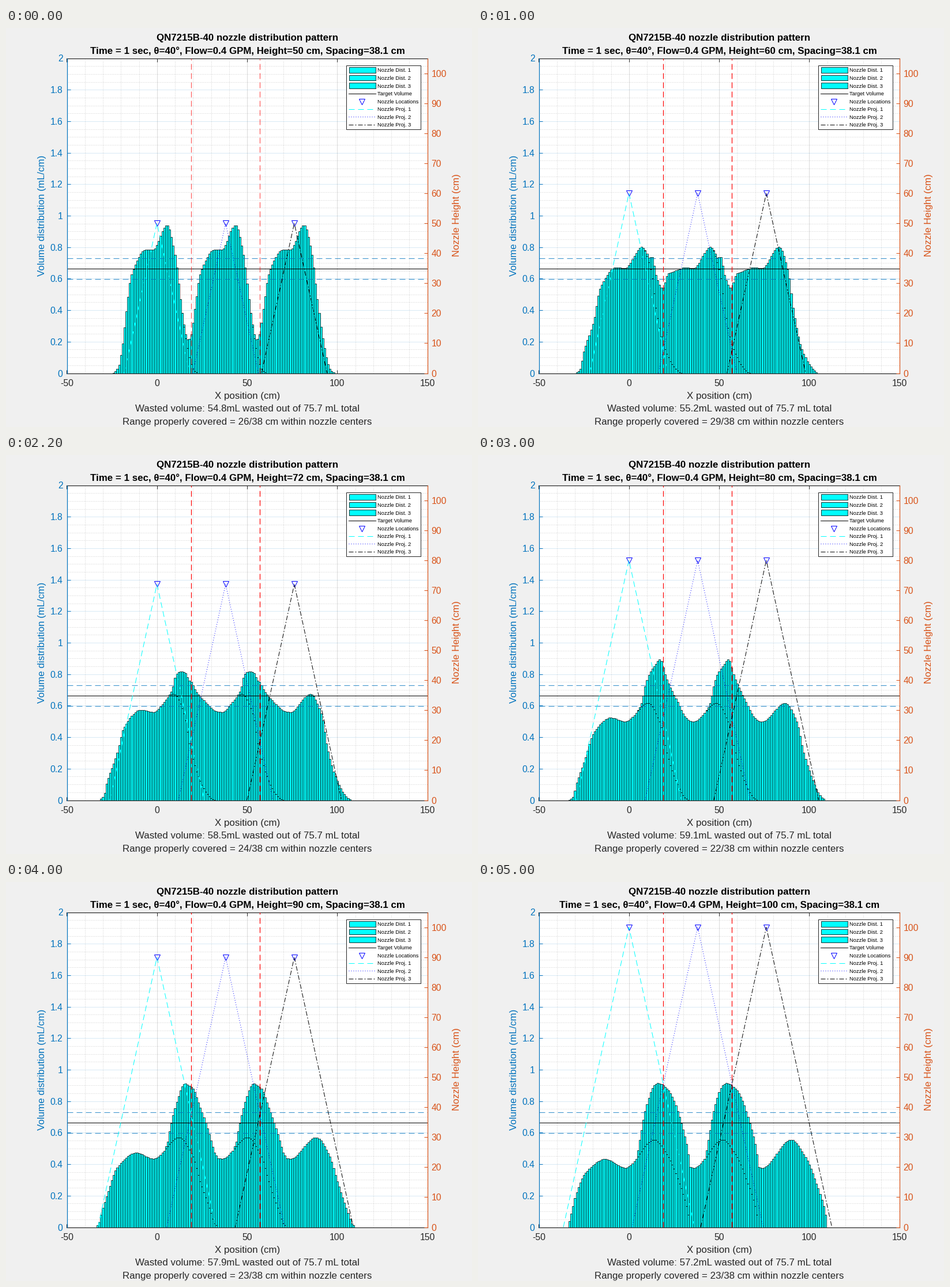
These frames come from a looping animation (808 by 693 pixels, 5.1 s). A matplotlib script:

```python
import numpy as np
import matplotlib.pyplot as plt
from matplotlib.animation import FuncAnimation
from matplotlib.collections import PolyCollection
from matplotlib.patches import Rectangle

W, H, DPI = 808, 693, 100
PX = 72 / DPI  # points per pixel
LEFT, RIGHT, TOP, BOTTOM = 105.5, 730.5, 52.5, 599.5

BLUE, ORANGE, INK = "#0072BD", "#D95319", "#262626"
DASH = (0, (10 * PX, 6 * PX))
DOT = (0, (1 * PX, 3 * PX))
DASH_DOT = (0, (8 * PX, 3 * PX, 2 * PX, 3 * PX))

FIRST, LAST = 50, 100  # nozzle heights in cm
SPACING = 38.1
NOZZLES = SPACING * np.arange(3)
SHIFTS = np.rint(NOZZLES).astype(int)
TARGET = 75.7 / 3 / SPACING
HALF_ANGLE = np.radians(20)
REACH = 33  # a spray covers this many cm on each side
BAR = 1

# Readouts at the heights where their trend changes
KEY_HEIGHTS = [50, 60, 72, 80, 85, 100]
WASTED = [54.8, 55.2, 58.5, 59.1, 58.2, 57.2]
COVERED = [26, 29, 24, 22, 23, 23]

plt.rcParams.update({
    "font.family": "Liberation Sans",
    "axes.unicode_minus": False,
    "lines.scale_dashes": False,
    "lines.linewidth": PX,
    "axes.linewidth": 1.2 * PX,
})


def monotone(x, xs, ys):
    """Cubic through the points that is flat at their highs and lows."""
    step = np.diff(xs)
    rise = np.diff(ys) / step
    a, b = rise[:-1], rise[1:]
    slope = np.zeros(len(xs))
    same = a * b > 0
    slope[1:-1][same] = 2 * (a * b)[same] / (a + b)[same]
    i = np.clip(np.searchsorted(xs, x) - 1, 0, len(step) - 1)
    t = np.clip((x - xs[i]) / step[i], 0, 1)
    return (ys[i] + (ys[i + 1] - ys[i]) * t * t * (3 - 2 * t)
            + step[i] * t * (1 - t) * (slope[i] * (1 - t) - slope[i + 1] * t))


def spray(height):
    """Volume per cm under one nozzle: a low hump, a dip and a high peak."""
    u = (height - FIRST) / (LAST - FIRST)
    root = np.sqrt(u)
    hump = 0.785 * (height / FIRST) ** -0.86
    dip = hump * (1 - 0.13 * u * u)
    peak = 0.555 + 0.385 * (1 - u) ** 2
    left_foot, right_foot = -21.7 - 12 * root, 20 + 14 * root
    points = np.array([
        (left_foot - 3, 0),
        (left_foot, 0.04 * hump),
        (-19.4 - 12.6 * root, 0.2 * hump),
        (-17 - 12.2 * u, 0.5 * hump),
        (-14 - 10 * u, 0.8 * hump),
        (-6 - 7 * u, hump),
        (-2, dip),
        (5.5 + 8.5 * u, peak),
        (10 + 12 * u, 0.8 * peak),
        (13 + 10 * u + 5 * u * u, 0.5 * peak),
        (16.5 + 16 * u, 0.2 * peak),
        (right_foot, 0.03 * peak),
        (right_foot + 3, 0),
    ])
    return monotone(np.arange(-REACH, REACH + 1), *points.T)


def stacked_bars(height):
    """Rectangles of each nozzle, stacked on the nozzles before it."""
    single = spray(height)
    base = np.zeros(SHIFTS[-1] + 2 * REACH + 1)
    groups = []
    for shift in SHIFTS:
        rects = []
        for k, v in enumerate(single):
            if v < 0.002:
                continue
            low = base[shift + k]
            x0 = shift + k - REACH - BAR / 2
            x1, high = x0 + BAR, low + v
            rects.append([(x0, low), (x0, high), (x1, high), (x1, low)])
        base[shift:shift + len(single)] += single
        groups.append(rects)
    return groups


fig = plt.figure(figsize=(W / DPI, H / DPI), dpi=DPI, facecolor="#F0F0F0")

# Plot area with its two value axes
ax = fig.add_axes([LEFT / W, 1 - BOTTOM / H, (RIGHT - LEFT) / W, (BOTTOM - TOP) / H])
right = ax.twinx()
ax.set(xlim=(-50, 150), ylim=(0, 2), xticks=range(-50, 151, 50),
       yticks=np.arange(11) / 5)
right.set(ylim=(0, 105), yticks=range(0, 101, 10))
ax.yaxis.set_major_formatter("{x:g}")
ax.set_axisbelow(True)

tick = dict(direction="in", length=6 * PX, width=PX, labelsize=15.8 * PX)
ax.tick_params(axis="x", top=True, color=INK, labelcolor=INK, pad=10.5 * PX, **tick)
ax.tick_params(axis="y", colors=BLUE, pad=7 * PX, **tick)
right.tick_params(axis="y", colors=ORANGE, pad=7 * PX, **tick)
for side, spine in ax.spines.items():
    spine.set_color(BLUE if side == "left" else INK)
ax.spines["right"].set_visible(False)
ax.spines["left"].set_zorder(3)
for side, spine in right.spines.items():
    spine.set_visible(side == "right")
    spine.set_color(ORANGE)

# Grid
minor = dict(colors="0.1", alpha=0.22, linewidths=PX,
             linestyles=[(0, (1 * PX, 2 * PX))], zorder=0.1)
ax.vlines([x for x in range(-40, 150, 10) if x % 50], 0, 2, **minor)
ax.hlines([k / 20 for k in range(1, 40) if k % 4], -50, 150, **minor)
ax.vlines([0, 50, 100], 0, 2, colors=INK, alpha=0.17, linewidths=PX, zorder=0.2)
ax.hlines(np.arange(1, 10) / 5, -50, 150, colors=BLUE, alpha=0.15,
          linewidths=PX, zorder=0.2)

# Bars and limits
bars = []
for _ in NOZZLES:
    group = PolyCollection([], facecolors="cyan", edgecolors="black",
                           linewidths=0.7 * PX, zorder=1)
    bars.append(ax.add_collection(group, autolim=False))
ax.axhline(TARGET, color="black", zorder=2)
for factor in (0.9, 1.1):
    ax.axhline(factor * TARGET, color=BLUE, alpha=0.8, ls=DASH, zorder=2)

# Nozzles and their projections
borders = [right.axvline(x, color="red", ls=DASH, lw=1.2 * PX)
           for x in (SPACING / 2, SPACING * 1.5)]
marker = dict(marker="v", ls="none", ms=10 * PX, mfc="none", mec="blue", mew=PX)
heads, = right.plot([], [], **marker)
STYLES = [("cyan", DASH), ("blue", DOT), ("black", DASH_DOT)]
rays = [right.plot([], [], color=c, ls=s)[0] for c, s in STYLES]

# Page in pixel units for the texts and the legend
page = fig.add_axes([0, 0, 1, 1], zorder=5)
page.set(xlim=(0, W), ylim=(H, 0))
page.axis("off")


def write(x, y, text="", size=16.87, color=INK, **kw):
    kw = {"ha": "center", "va": "baseline", **kw}
    return page.text(x, y, text, fontsize=size * PX, color=color, **kw)


write(418.5, 22, "QN7215B-40 nozzle distribution pattern", color="black", weight="bold")
headline = write(418.5, 44.5, color="black", weight="bold")
write(418.5, 644, "X position (cm)")
wasted_line = write(418.5, 666)
covered_line = write(418.5, 689)
write(63, 326, "Volume distribution (mL/cm)", color=BLUE, rotation=90, va="center")
write(781.5, 325.5, "Nozzle Height (cm)", color=ORANGE, rotation=90, va="center")

page.add_patch(Rectangle((589.5, 64.5), 129, 111, fc="white", ec=INK, lw=PX))
ENTRIES = [f"Nozzle Dist. {n}" for n in (1, 2, 3)]
ENTRIES += ["Target Volume", "Nozzle Locations"]
ENTRIES += [f"Nozzle Proj. {n}" for n in (1, 2, 3)]
for i, label in enumerate(ENTRIES):
    y = 73 + 13.55 * i
    write(643.5, y + 3.4, label, size=9.4, color="black", ha="left")
    if i < 3:
        page.add_patch(Rectangle((594.5, y - 5), 46, 9.5, fc="cyan", ec="black",
                                 lw=0.8 * PX))
    elif i == 4:
        page.plot(617, y + 0.5, **marker)
    else:
        color, style = ("black", "-") if i == 3 else STYLES[i - 5]
        page.plot([594, 641], [y, y], color=color, ls=style)


def update(i):
    h = FIRST + i
    for group, rects in zip(bars, stacked_bars(h)):
        group.set_verts(rects)
    heads.set_data(NOZZLES, [h] * 3)
    spread = h * np.tan(HALF_ANGLE)
    for ray, x in zip(rays, NOZZLES):
        ray.set_data([x - spread, x, x + spread], [0, h, 0])
    for line in borders:  # the translucent borders pile up with every step
        line.set_alpha(1 - 0.35 ** (i + 1))

    headline.set_text(f"Time = 1 sec, θ=40°, Flow=0.4 GPM, Height={h} cm, "
                      f"Spacing={SPACING} cm")
    wasted = np.interp(h, KEY_HEIGHTS, WASTED)
    covered = round(np.interp(h, KEY_HEIGHTS, COVERED))
    wasted_line.set_text(f"Wasted volume: {wasted:.1f}mL wasted out of 75.7 mL total")
    covered_line.set_text(f"Range properly covered = {covered}/38 cm within nozzle centers")


anim = FuncAnimation(fig, update, frames=LAST - FIRST + 1, interval=100,
                     repeat=True, blit=False)
plt.show()
```
